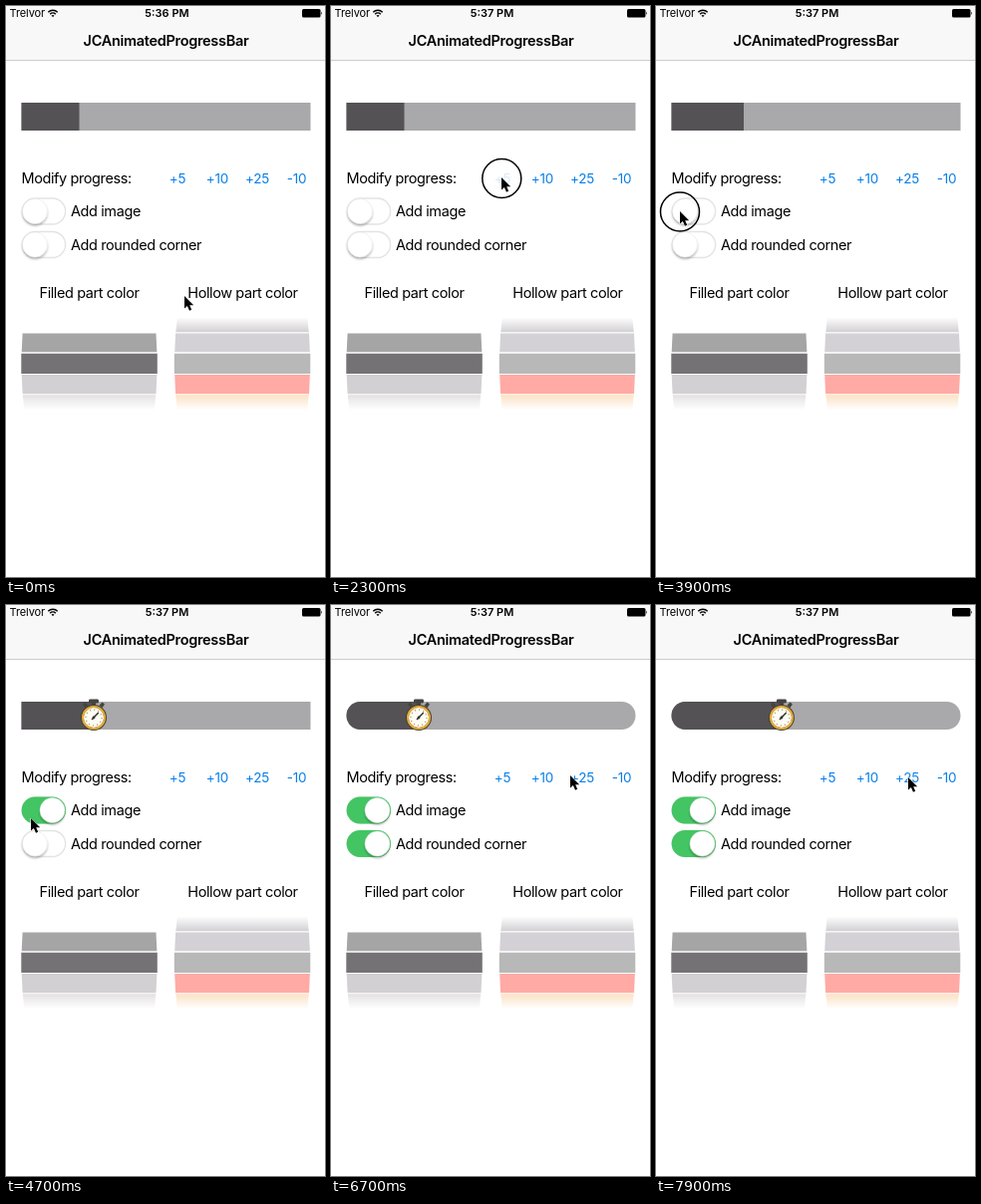
Recreate the animation shown at these times as an HTML page. Size 320 by 573 pixels, loop 8000 ms.

```html
<!DOCTYPE html>
<html lang="en">
<head>
<meta charset="utf-8">
<title>Progress bar demo</title>
<style>
html, body { margin: 0; width: 100%; height: 100%; overflow: hidden; background: #fff; }
svg { display: block; width: 100%; height: 100%; }
text { font: 14.5px Inter, sans-serif; letter-spacing: -.4px; fill: #000; }
.mid { text-anchor: middle; }
.title { font-weight: 600; letter-spacing: -.3px; }
.status { font-size: 11px; letter-spacing: -.1px; }
.clock { font-size: 11px; font-weight: 600; letter-spacing: 0; }
.button { font-size: 13.5px; letter-spacing: -.2px; fill: #087fe8; text-anchor: middle; }
</style>
</head>
<body>
<svg viewBox="0 0 320 573">
  <defs>
    <linearGradient id="fadeUp" x2="0" y2="1"><stop stop-color="#fff"/><stop offset="1" stop-color="#fff" stop-opacity="0"/></linearGradient>
    <linearGradient id="fadeDown" x2="0" y2="1"><stop stop-color="#fff" stop-opacity="0"/><stop offset="1" stop-color="#fff"/></linearGradient>
    <filter id="shadow" x="-30%" y="-30%" width="160%" height="180%"><feDropShadow dx="0" dy="2" stdDeviation="1.3" flood-opacity=".28"/></filter>
    <clipPath id="barClip"><rect id="barShape" x="15.5" y="97" width="290" height="28"/></clipPath>
  </defs>

  <rect width="320" height="54" fill="#f8f8f8"/>
  <rect y="54" width="320" height=".6" fill="#aaa"/>
  <text class="status" x="3.5" y="11">Trelvor</text>
  <g fill="none" stroke="#000" stroke-width="1.5">
    <path d="M42.3 6.2a6.6 6.6 0 0 1 9.4 0M44.2 8.2a4 4 0 0 1 5.6 0"/>
    <path d="M47 11.2l-1.5-1.6a2.2 2.2 0 0 1 3 0z" fill="#000" stroke="none"/>
  </g>
  <text id="clock" class="clock mid" x="161.5" y="11"></text>
  <rect x="297" y="3" width="18.5" height="8.5" rx="1.5"/>
  <path d="M316.2 5.5q1.6 1.7 0 3.5z"/>
  <text class="title mid" x="160.5" y="40">JCAnimatedProgressBar</text>

  <g clip-path="url(#barClip)">
    <rect x="15" y="97" width="291" height="28" fill="#a9a8aa"/>
    <rect id="fill" x="15" y="97" height="28" fill="#555256"/>
  </g>
  <g id="watch">
    <g fill="#45433f">
      <rect x="-5" y="94.5" width="10" height="4" rx="1.4"/>
      <rect x="-2" y="98" width="4" height="4"/>
      <path d="M-11 99.5l2.5-2 3 3.2-3 2.5zM11 99.5l-2.5-2-3 3.2 3 2.5z"/>
    </g>
    <circle cy="113" r="11.6" fill="#fffdf4" stroke="#4b412e" stroke-width="2.8"/>
    <circle cy="113" r="11" fill="none" stroke="#e2ad3d" stroke-width="2"/>
    <circle cy="113" r="8" fill="none" stroke="#b89b62" stroke-width="1.6" stroke-dasharray="1 3.19"/>
    <path d="M-2 115L4.8 108" stroke="#333" stroke-width="1.5"/>
    <circle cy="113" r="1.4" fill="#333"/>
  </g>

  <text x="15.5" y="178">Modify progress:</text>
  <text x="65" y="211">Add image</text>
  <text x="65" y="245">Add rounded corner</text>
  <text class="mid" x="83.5" y="292.5">Filled part color</text>
  <text class="mid" x="237.5" y="292.5">Hollow part color</text>
  <g id="buttons"></g>
  <g id="switches"></g>
  <g id="pickers"></g>

  <circle id="ring" r="19.5" fill="none" stroke="#000" stroke-width="1.5"/>
  <path id="cursor" d="M0 0V12.6L2.9 10 5 14.8 7.2 13.8 5.2 9.2H9.2z" stroke="#fff" stroke-width="1" paint-order="stroke"/>
</svg>
<script>
const $ = id => document.getElementById(id);
const clamp = v => Math.max(0, Math.min(1, v));
const ease = v => v * v * (3 - 2 * v);
const ramp = (t, start, length) => ease(clamp((t - start) / length));

$('buttons').innerHTML = [['+5', 172], ['+10', 212], ['+25', 252], ['-10', 291.5]]
  .map(([label, x]) => `<text class="button" x="${x}" y="178">${label}</text>`).join('');

$('switches').innerHTML = [206, 239.5].map(y => `<g>
  <rect x="16.2" y="${y - 13}" width="43.4" height="26" rx="13" fill="#fff" stroke="#e3e3e3" stroke-width="1.3"/>
  <rect x="15.6" y="${y - 13.5}" width="44.4" height="27" rx="13.5" fill="#43c563"/>
  <circle cx="29" cy="${y}" r="12.5" fill="#fff" stroke="#ddd" stroke-width=".4" filter="url(#shadow)"/></g>`).join('');

// Wheel rows narrow away from the middle row.
const rows = [[313, 327.3, 3, 1.5], [328.5, 347.3, 1.3, .4], [348.7, 369, 0, 0], [370, 389.2, .4, 1.3], [390.2, 405, 1.5, 3]];
const picker = (x, colors) => rows.map(([top, bottom, a, b], i) =>
  `<path fill="${colors[i]}" d="M${x + a} ${top}H${x + 136.5 - a}L${x + 136.5 - b} ${bottom}H${x + b}z"/>`).join('') +
  `<rect x="${x - 1}" y="312" width="139" height="16" fill="url(#fadeUp)"/>
   <rect x="${x - 1}" y="389.5" width="139" height="16" fill="url(#fadeDown)"/>`;
$('pickers').innerHTML =
  picker(15.3, ['#fff', '#a6a5a6', '#757276', '#d2d0d3', '#e3dfdf']) +
  picker(168.8, ['#cfcdd1', '#d3d1d5', '#b8b8b8', '#ffaaa5', '#fbe0c2']);

// Pointer stops: time, x, y
const path = [[0, 179, 291], [150, 179, 291], [900, 167, 178], [1000, 167, 177], [1300, 171, 176], [2000, 171, 172],
  [2600, 171, 172], [3200, 73, 197], [3300, 59, 199], [3650, 24, 206], [4200, 24, 206], [4700, 25, 214],
  [5200, 29, 239], [5500, 29, 240], [6250, 29, 240], [6700, 240, 171], [7050, 253, 173], [8000, 253, 173]];
// Presses: start, end, centre of the ring
const presses = [[2200, 2500, 171.3, 173], [3700, 4000, 24, 206.5], [5600, 5900, 29, 240], [7350, 7690, 254, 173]];

function pointer(t) {
  const i = path.findIndex(p => p[0] > t);
  const [t0, x0, y0] = path[i - 1], [t1, x1, y1] = path[i];
  const k = ramp(t, t0, t1 - t0);
  return [x0 + (x1 - x0) * k, y0 + (y1 - y0) * k];
}

const buttonAlpha = (t, [down, up]) => t < down ? 1 : .15 + .85 * ramp(t, up, 250);

function render(t) {
  $('clock').textContent = t < 1200 ? '5:36 PM' : '5:37 PM';

  const percent = 20 + 5 * ramp(t, 2500, 400) + 25 * ramp(t, 7700, 390);
  const end = 15.5 + 2.9 * percent;
  $('fill').setAttribute('width', end - 15);
  $('watch').setAttribute('transform', `translate(${end} 0)`);
  $('watch').style.display = t < 4000 ? 'none' : '';
  $('barShape').setAttribute('rx', t < 5900 ? 0 : 14);

  const buttons = $('buttons').children;
  buttons[0].style.opacity = buttonAlpha(t, presses[0]);
  buttons[2].style.opacity = buttonAlpha(t, presses[3]);

  [...$('switches').children].forEach((group, i) => {
    const on = ramp(t, presses[i + 1][1], 250);
    group.children[1].setAttribute('opacity', on);
    group.children[2].setAttribute('cx', 29 + 17.5 * on);
  });

  const press = presses.find(p => t >= p[0] && t < p[1]);
  $('ring').style.display = press ? '' : 'none';
  if (press) $('ring').setAttribute('transform', `translate(${press[2]} ${press[3]})`);
  $('cursor').setAttribute('transform', `translate(${pointer(t)})`);
}

function tick() {
  render(performance.now() % 8000);
  requestAnimationFrame(tick);
}
tick();
</script>
</body>
</html>
```
